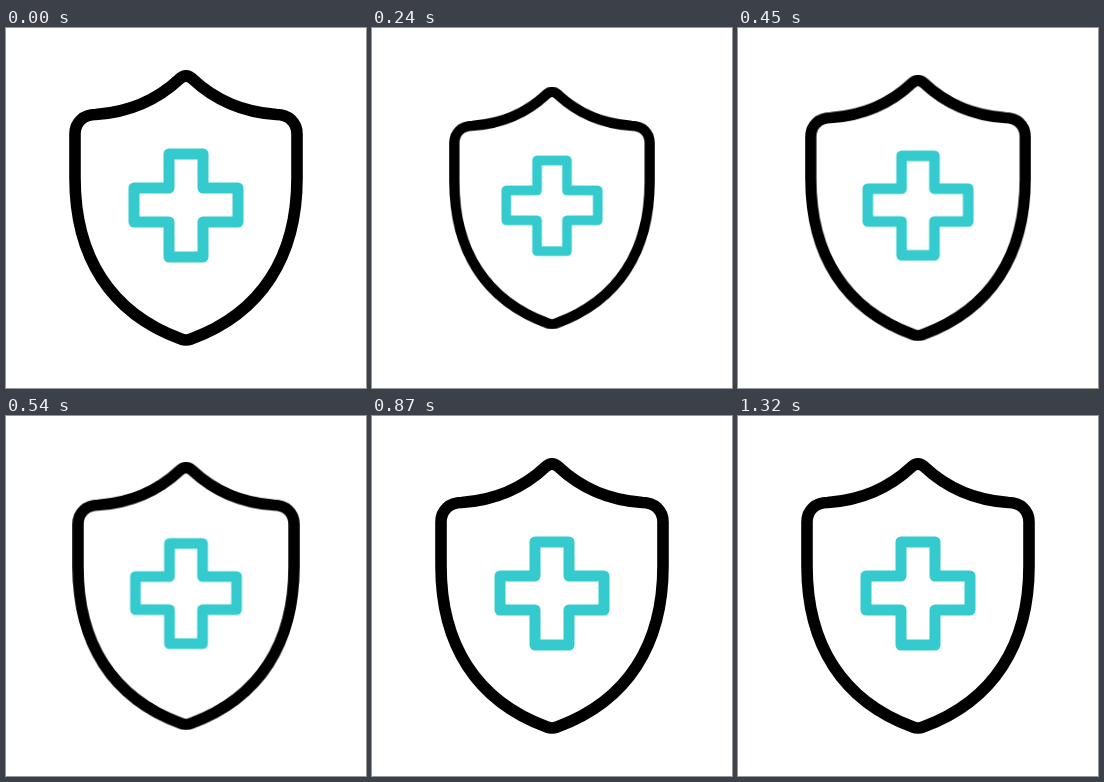
These frames come from a looping animation (360x360 px, 1.38 s). An HTML page without scripts:

```html
<!DOCTYPE html>
<html lang="en">
<head>
<meta charset="utf-8">
<title>Health shield</title>
<style>
  html, body {
    margin: 0;
    width: 100%;
    height: 100%;
    overflow: hidden;
    background: #fff;
  }
  svg { display: block; width: 100%; height: 100%; }
  .badge {
    fill: none;
    stroke-linejoin: round;
    transform-origin: 180px 180px;
    animation: squeeze 1380ms infinite;
  }
  .shield { stroke: #000; stroke-width: 11.6; }
  .cross { stroke: #35cbce; stroke-width: 11; }

  /* Quick squeeze, then a release that bounces against full size. */
  @keyframes squeeze {
    0% { transform: scale(1); animation-timing-function: linear; }
    1.45% { transform: scale(1); animation-timing-function: cubic-bezier(.333, .95, .667, 1); }
    21.74% { transform: scale(.878); animation-timing-function: cubic-bezier(.333, 0, .667, .333); }
    34.64% { transform: scale(1); animation-timing-function: cubic-bezier(.333, .667, .667, 1); }
    41.09% { transform: scale(.97); animation-timing-function: cubic-bezier(.333, 0, .667, .333); }
    47.54% { transform: scale(1); animation-timing-function: cubic-bezier(.333, .667, .667, 1); }
    50.76% { transform: scale(.993); animation-timing-function: cubic-bezier(.333, 0, .667, .333); }
    53.99%, 100% { transform: scale(1); }
  }
</style>
</head>
<body>
<svg viewBox="0 0 360 360">
  <g class="badge">
    <path class="shield" d="M69 106C69 94 78 86.500 89.500 86.500C121 84.500 149 74 174 50.500Q180 45.500 186 50.500C211 74 239 84.500 270.500 86.500C282 86.500 291 94 291 106V150C291 228 256 285 185 311Q180 313 175 311C104 285 69 228 69 150Z"/>
    <path class="cross" d="M163 126H197V160H232V194H197V229H163V194H128V160H163Z"/>
  </g>
</svg>
</body>
</html>
```
